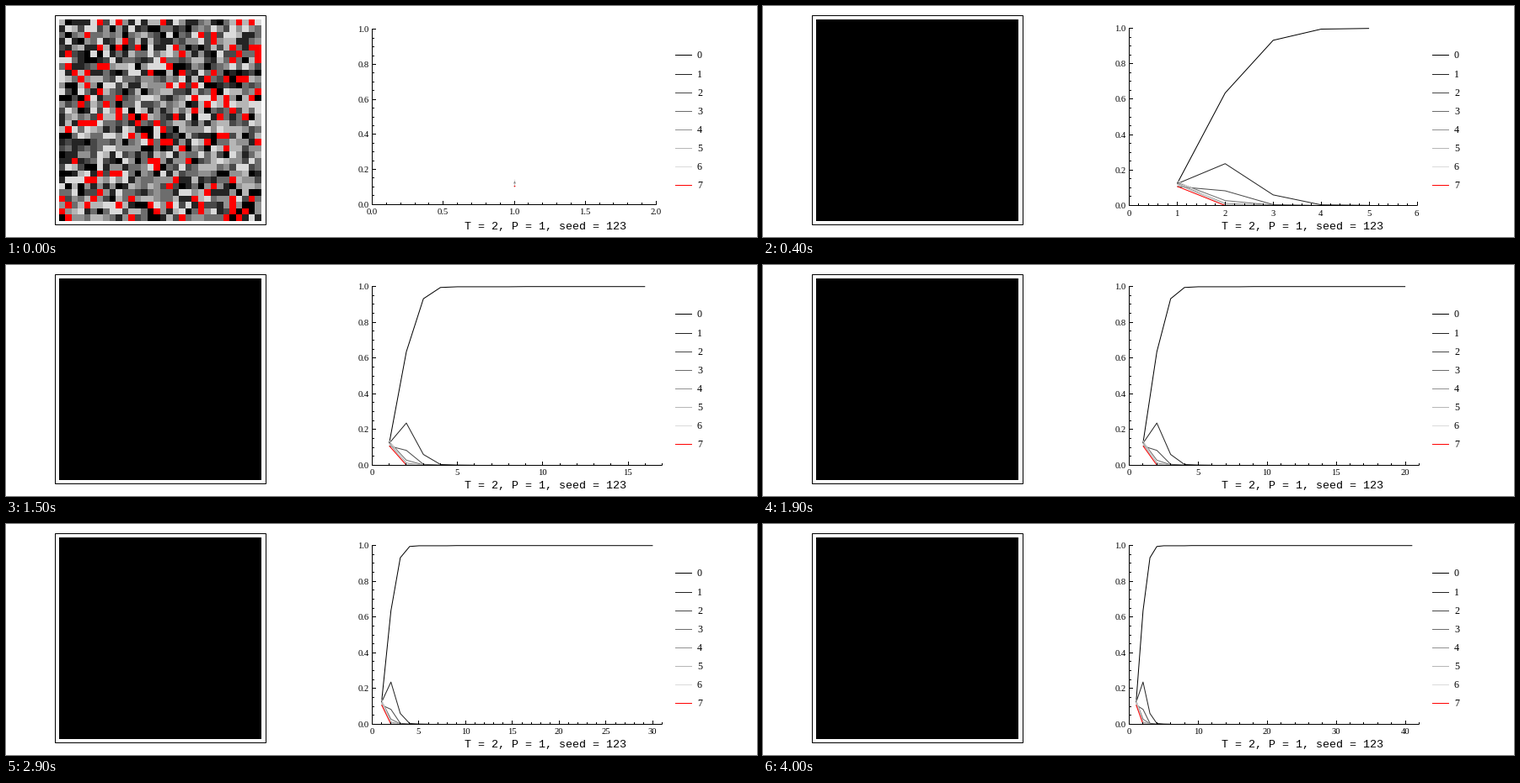
Animation, 891 px wide and 275 px high, one loop 4100 ms. Source, as a matplotlib script:

```python
import matplotlib.pyplot as plt
import numpy as np
from matplotlib.animation import FuncAnimation
from matplotlib.patches import Rectangle

W, H, DPI = 891, 275, 64
PX = 72 / DPI  # points per pixel
FRAMES, INTERVAL = 41, 100
CELLS, STATES = 32, 8

LEFT, RIGHT, MID_Y = 434.5, 778.5, 132
GOLDEN = (1 + 5 ** 0.5) / 2
SERIF, MONO = "Liberation Serif", "Liberation Mono"

COLORS = [(s / 7,) * 3 for s in range(STATES - 1)] + [(1, 0, 0)]

# Share of each state over the first generations; the rest is constant.
SHARES = [
    [0.124, 0.635, 0.932, 0.995] + [0.999] * 4,
    [0.123, 0.236, 0.060, 0.004, 0.001],
    [0.107, 0.083, 0.005],
    [0.131, 0.028, 0.002],
    [0.124, 0.012],
    [0.119, 0.004],
    [0.138, 0.002],
    [0.108],
]


def full_series(state):
    """Shares per generation; an extinct state ends at its first zero."""
    start = SHARES[state]
    values = np.full(FRAMES, 1.0 if state == 0 else np.nan)
    values[:len(start)] = start
    if state:
        values[len(start)] = 0
    return values


def lowest_neighbour(grid):
    shifts = [(dy, dx) for dy in (-1, 0, 1) for dx in (-1, 0, 1) if dy or dx]
    return np.min([np.roll(grid, s, axis=(0, 1)) for s in shifts], axis=0)


def make_grids():
    odds = np.array([share[0] for share in SHARES])
    rng = np.random.default_rng(123)
    grids = [rng.choice(STATES, (CELLS, CELLS), p=odds / odds.sum())]
    for _ in range(3):
        grids.append(lowest_neighbour(grids[-1]))
    grids.append(np.zeros_like(grids[0]))
    return grids


SERIES = [full_series(s) for s in range(STATES)]
GRIDS = make_grids()
PALETTE = np.array(COLORS)

fig = plt.figure(figsize=(W / DPI, H / DPI), dpi=DPI, facecolor="white")
ax = fig.add_axes([0, 0, 1, 1])


def line(xs, ys, color="black"):
    ax.plot(xs, ys, color=color, lw=PX, solid_capstyle="butt", snap=False)


def label(x, y, text, size=10.67, font=SERIF, ha="center"):
    ax.text(x, y, text, fontsize=size * PX, family=font, ha=ha, va="baseline")


def pixel(v):
    return np.floor(v) + 0.5


def tick_steps(end):
    for limit, major, minor in ((3.5, 0.5, 0.1), (7, 1, 0.2),
                                (15, 2, 0.5), (35, 5, 1)):
        if end <= limit:
            return major, minor
    return 10, 2


def ticks(end, step):
    return np.arange(int(end / step + 1e-6) + 1) * step


def draw_grid(frame):
    grid = GRIDS[min(frame, len(GRIDS) - 1)]
    ax.imshow(PALETTE[grid], extent=(63, 303, 256, 16), aspect="auto",
              interpolation="nearest")
    ax.add_patch(Rectangle((58.5, 11.5), 250, 249, fill=False, lw=PX,
                           snap=False))


def draw_chart(count):
    end = count + 1
    major, minor = tick_steps(end)
    form = "{:.1f}" if major < 1 else "{:.0f}"

    # The plot shrinks when its last label sits at the very end.
    width = RIGHT - LEFT
    at_end = end % major == 0
    if at_end:
        width -= {1: 2.5, 2: 5, 3: 7}[len(form.format(end))]
    height = width / GOLDEN
    bottom = MID_Y + height / 2

    def px(v):
        return LEFT + width * v / end

    def py(v):
        return bottom - height * v

    xs = px(np.arange(1, count + 1))
    for values, color in zip(SERIES, COLORS):
        if count == 1:
            ax.plot(xs, py(values[:1]), ".", color=color, ms=3 * PX, mew=0,
                    snap=False)
        else:
            line(xs, py(values[:count]), color)

    base, top = pixel(bottom), pixel(py(1))
    line([LEFT - 0.5, px(end)], [base, base])
    line([LEFT, LEFT], [base + 0.5, top - 0.5])
    for step, size in ((minor, 2.5), (major, 4.5)):
        for v in ticks(end, step):
            x = pixel(px(v))
            line([x, x], [base, base - size])
    for step, size in ((0.05, 2.5), (0.2, 4.5)):
        for v in ticks(1, step):
            y = pixel(py(v))
            line([LEFT, LEFT + size], [y, y])

    for v in ticks(end, major):
        label(px(v) - 0.5, base + 12, form.format(v))
    for v in ticks(1, 0.2):
        label(430.5, pixel(py(v)) + 3.5, f"{v:.1f}", ha="right")

    draw_legend(at_end and end >= 10)


def draw_legend(between_pixels):
    for s, color in enumerate(COLORS):
        row = int(58.9 + 22.1 * s)
        y = row + (1 if between_pixels else 0.5)
        line([794, 814], [y, y], color)
        label(823, row + 4, str(s), size=12)


def draw(frame):
    ax.clear()
    draw_grid(frame)
    draw_chart(frame + 1)
    label(544.5, 266, "T = 2, P = 1, seed = 123", size=13.33, font=MONO, ha="left")
    ax.set(xlim=(0, W), ylim=(H, 0))
    ax.axis("off")
    return []


anim = FuncAnimation(fig, draw, frames=FRAMES, interval=INTERVAL,
                     repeat=True, repeat_delay=0, blit=False)
plt.show()
```
